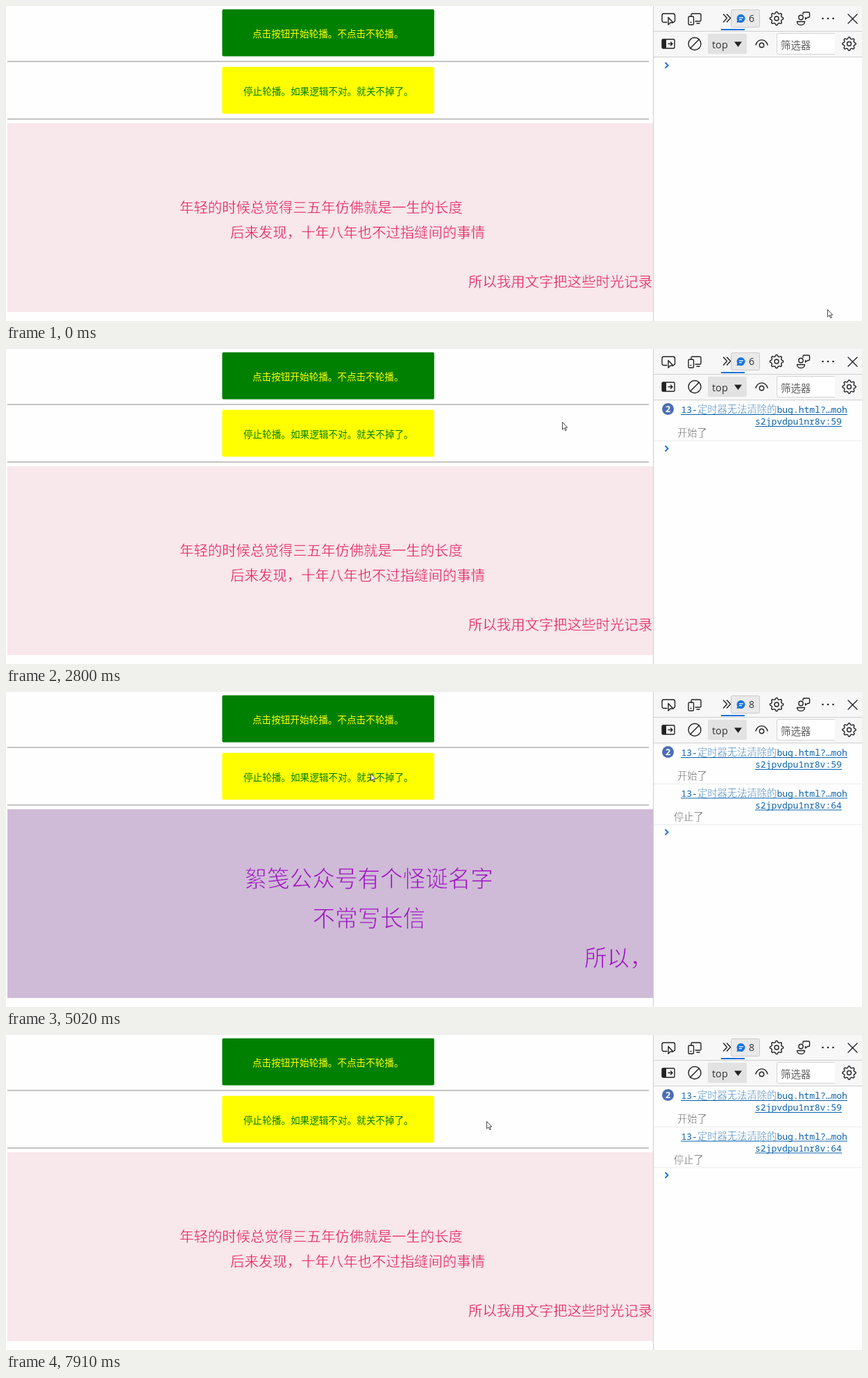
An HTML page that plays this animation: 1233 by 454 pixels, repeating every 7.99 s.

```html
<!DOCTYPE html>
<html lang="zh-CN">
<head>
<meta charset="utf-8">
<title>轮播定时器</title>
<style>
  html, body { margin: 0; width: 100%; height: 100%; overflow: hidden; background: #fefefe; }
  svg { display: block; width: 100%; height: 100%; }
  text { font-family: "Noto Sans CJK SC", "Noto Sans CJK", sans-serif; white-space: pre; }
  .btn { font-size: 13.6px; }
  /* strokes in the background colour thin the glyphs */
  .pink { font-size: 20.4px; font-weight: 300; fill: #e61a5e; stroke: #f8e7eb; stroke-width: .4; }
  .purple { font-size: 32.6px; font-weight: 300; fill: #a016c4; stroke: #cfbbd7; stroke-width: .8; }
  .ui { font-family: "Open Sans", "Noto Sans", sans-serif; }
  .mono { font-family: "Noto Sans Mono", "DejaVu Sans Mono", monospace; font-size: 13px; }
  .link { fill: #0b62ad; }
  .cjk { font-size: 14.3px; font-weight: 300; stroke: #fefefe; stroke-width: .35; }
  .icon { fill: none; stroke: #222; stroke-width: 1.4; stroke-linejoin: round; stroke-linecap: round; }
</style>
</head>
<body>
<svg viewBox="0 0 1233 454">
  <rect width="1233" height="454" fill="#fefefe"/>
  <rect x="311.4" y="4.7" width="305.4" height="67.8" rx="2" fill="#008000"/>
  <text class="btn" x="355" y="45" fill="#ffff00">点击按钮开始轮播。不点击不轮播。</text>
  <path d="M2 79.8H926M2 162.8H926" stroke="#bcbcbc" stroke-width="1.7"/>
  <rect x="311.4" y="87.7" width="305.4" height="67.6" rx="2" fill="#ffff00"/>
  <text class="btn" x="342" y="127.5" fill="#008000">停止轮播。如果逻辑不对。就关不掉了。</text>

  <clipPath id="page"><rect x="2" y="169" width="930" height="272"/></clipPath>
  <g clip-path="url(#page)">
    <g id="slideA">
      <rect x="2" y="169" width="930" height="272" fill="#f8e7eb"/>
      <text class="pink" x="250" y="297.8">年轻的时候总觉得三五年仿佛就是一生的长度</text>
      <text class="pink" x="323" y="333.6">后来发现，十年八年也不过指缝间的事情</text>
      <text class="pink" x="666" y="404.8">所以我用文字把这些时光记录</text>
    </g>
    <g id="slideB">
      <rect x="2" y="169" width="930" height="272" fill="#cfbbd7"/>
      <text class="purple" x="343.5" y="280.5">絮笺公众号有个怪诞名字</text>
      <text class="purple" x="441.5" y="337.5">不常写长信</text>
      <text class="purple" x="833" y="395">所以，</text>
    </g>
  </g>

  <rect x="933" width="300" height="73" fill="#f7f7f7"/>
  <path d="M932.5 0V454M933 36.5H1233M933 73.5H1233" stroke="#cfcfcf"/>
  <rect x="1030" y="33" width="34" height="2" fill="#1a73d9"/>
  <rect x="1044.5" y="5.5" width="41" height="25" rx="2" fill="#e9e9e9" stroke="#cacaca"/>
  <path d="M1058.5 12a6 6 0 1 1-2.6 11.4L1052.5 24l.8-3.2A6 6 0 0 1 1058.5 12Z" fill="#1a73d9"/>
  <path d="M1056 16.8H1062M1056 19.6H1060" stroke="#fff" stroke-width="1.2"/>
  <text id="count" class="ui" x="1070" y="23" font-size="14"></text>

  <g class="icon">
    <path d="M952 23.5H947.5a2.5 2.5 0 0 1-2.5-2.5V13.5a2.5 2.5 0 0 1 2.5-2.5H961a2.5 2.5 0 0 1 2.5 2.5V21a2 2 0 0 1-1.5 2M954 16.5V27L957 24H961Z"/>
    <path d="M987 15V12.5a1.5 1.5 0 0 1 1.5-1.5H999.5a1.5 1.5 0 0 1 1.5 1.5V20.5a1.5 1.5 0 0 1-1.5 1.5H993M995 25H999M986 23.5H987"/>
    <rect x="983" y="15" width="7.5" height="12" rx="1.5"/>
    <path d="M1033.5 12L1038.5 17.5L1033.5 23M1038.5 12L1043.5 17.5L1038.5 23"/>
    <circle cx="1145" cy="16.5" r="3.2"/>
    <path d="M1139.5 22.5H1150.5C1150.5 29 1139.5 29 1139.5 22.5ZM1148 12V10.5a1.5 1.5 0 0 1 1.5-1.5H1156a1.5 1.5 0 0 1 1.5 1.5V15a1.5 1.5 0 0 1-1.5 1.5H1154.5L1151.5 19V16.5"/>
    <path d="M1213 12L1226 25M1226 12L1213 25"/>
    <rect x="945" y="48" width="18" height="13" rx="1.5"/>
    <path d="M954 54.5H960M957.5 52L960 54.5L957.5 57"/>
    <circle cx="992" cy="54.5" r="9"/>
    <path d="M985.6 60.9L998.4 48.1"/>
    <path d="M1080 56C1083 46.5 1094 46.5 1097 56"/>
    <circle cx="1088.5" cy="56.5" r="3.2"/>
    <path id="gears"/>
  </g>
  <path d="M945 48H951V61H945Z" fill="#222"/>
  <g fill="#222">
    <circle cx="1176.5" cy="18" r="1.3"/><circle cx="1184" cy="18" r="1.3"/><circle cx="1191.5" cy="18" r="1.3"/>
  </g>
  <rect x="1011" y="40" width="56" height="29" rx="2" fill="#e2e2e2"/>
  <text class="ui" x="1017" y="60.5" font-size="14.5" fill="#333">top</text>
  <path d="M1049 51.5H1060L1054.5 59Z" fill="#222"/>
  <path d="M1194 40H1113a2 2 0 0 0-2 2V67a2 2 0 0 0 2 2H1194Z" fill="#fff"/>
  <path d="M1194 39.5H1113a2.5 2.5 0 0 0-2.5 2.5V67a2.5 2.5 0 0 0 2.5 2.5H1194" fill="none" stroke="#d4d4d4"/>
  <text x="1116" y="61.5" font-size="14.4" fill="#606060">筛选器</text>

  <g id="logs"></g>
  <g id="badge">
    <circle cx="953.5" cy="86.5" r="8.5" fill="#4b6fb5"/>
    <text class="ui" x="953.5" y="91" font-size="12.5" font-weight="700" fill="#fff" text-anchor="middle">2</text>
  </g>
  <path id="prompt" d="M949.5 -4L953.5 0L949.5 4" fill="none" stroke="#1a73d9" stroke-width="1.9"/>
  <path id="cursor" d="M.5 .5V11L3 8.8L4.7 12.7L6.3 12L4.6 8.2H7.7Z" fill="#fff" stroke="#333" stroke-width=".9" stroke-linejoin="round"/>
</svg>
<script>
const LOOP = 7990;
const $ = id => document.getElementById(id);
const show = (el, on) => el.setAttribute('visibility', on ? 'visible' : 'hidden');

function gear(cx, cy) {
  let d = '';
  for (let i = 0; i < 32; i++) {
    const a = (i - 1.5) * Math.PI / 16;
    const r = i % 4 === 1 || i % 4 === 2 ? 9.6 : 7.5;
    d += (i ? 'L' : 'M') + (cx + r * Math.sin(a)).toFixed(2) + ' ' + (cy - r * Math.cos(a)).toFixed(2);
  }
  return d + `ZM${cx + 3} ${cy}a3 3 0 1 0-6 0a3 3 0 1 0 6 0Z`;
}
$('gears').setAttribute('d', gear(1110, 18) + gear(1214.5, 54.5));

const logEntry = (y, line, word) => `<g>
  <g class="link">
    <text class="mono" x="972.5" y="${y}">13-</text>
    <text class="cjk" x="996" y="${y}" fill="#3f83bf">定时器无法清除的</text>
    <text class="mono" x="1110.5" y="${y}">bug.html?…moh</text>
    <text class="mono" x="1079" y="${y + 17}">s2jpvdpu1nr8v:${line}</text>
  </g>
  <path d="M972 ${y + 2.5}H1212M1079 ${y + 19.5}H1204" stroke="#0b62ad"/>
  <text class="cjk word" x="962" y="${y + 34}" fill="#666">${word}</text>
  <path d="M933 ${y + 40.5}H1233" stroke="#ececec"/></g>`;
$('logs').innerHTML = logEntry(92, 59, '开始了') + logEntry(150.5, 64, '停止了');
const [startLog, stopLog] = $('logs').children;
const startWord = startLog.querySelector('.word');

// Cursor moves: first step, last step, step count, end point, optional bend point
const start = [1183, 437];
const moves = [
  [70, 790, 10, [556, 20], [760, -60]],
  [1010, 1010, 1, [546, 17]],
  [1240, 1240, 1, [555, 25]],
  [1550, 1550, 1, [592, 39]],
  [1628, 1940, 5, [890, 109]],
  [2490, 3200, 10, [617, 119], [770, 98]],
  [3290, 3290, 1, [615, 119]],
  [3530, 3920, 6, [527, 120], [570, 127]],
  [4620, 4770, 3, [525, 117]],
  [6500, 6810, 5, [695, 111.5]],
  [7910, 7910, 1, [692, 124]]
];
const ease = p => p * p * (3 - 2 * p);

function cursorAt(t) {
  let from = start;
  for (const [t0, t1, n, to, bend] of moves) {
    if (t < t0) break;
    if (t < t1) {
      const k = Math.floor((t - t0) / (t1 - t0) * (n - 1) + 1e-6) + 1;
      const p = ease(k / n);
      return from.map((a, i) => {
        const c = bend ? bend[i] : (a + to[i]) / 2;
        return a * (1 - p) ** 2 + 2 * c * p * (1 - p) + to[i] * p * p;
      });
    }
    from = to;
  }
  return from;
}

function draw(t) {
  const purple = t >= 4260 && t < 7220;
  show($('slideA'), !purple);
  show($('slideB'), purple);

  const count = $('count');
  count.textContent = t < 4260 ? 6 : t < 4390 ? 7 : 8;
  count.setAttribute('fill', count.textContent === '7' ? '#a016c4' : '#333');

  const started = t >= 1160, repeated = t >= 1240, stopped = t >= 4920;
  show(startLog, started);
  show(stopLog, stopped);
  show($('badge'), repeated);
  startWord.setAttribute('x', repeated ? 967 : 962);
  $('prompt').setAttribute('transform', `translate(0 ${stopped ? 202 : started ? 143.5 : 85.5})`);

  const [x, y] = cursorAt(t);
  $('cursor').setAttribute('transform', `translate(${Math.round(x)} ${Math.round(y)})`);
}

const origin = performance.now();
function tick() {
  draw((performance.now() - origin) % LOOP);
  requestAnimationFrame(tick);
}
draw(0);
requestAnimationFrame(tick);
</script>
</body>
</html>
```
